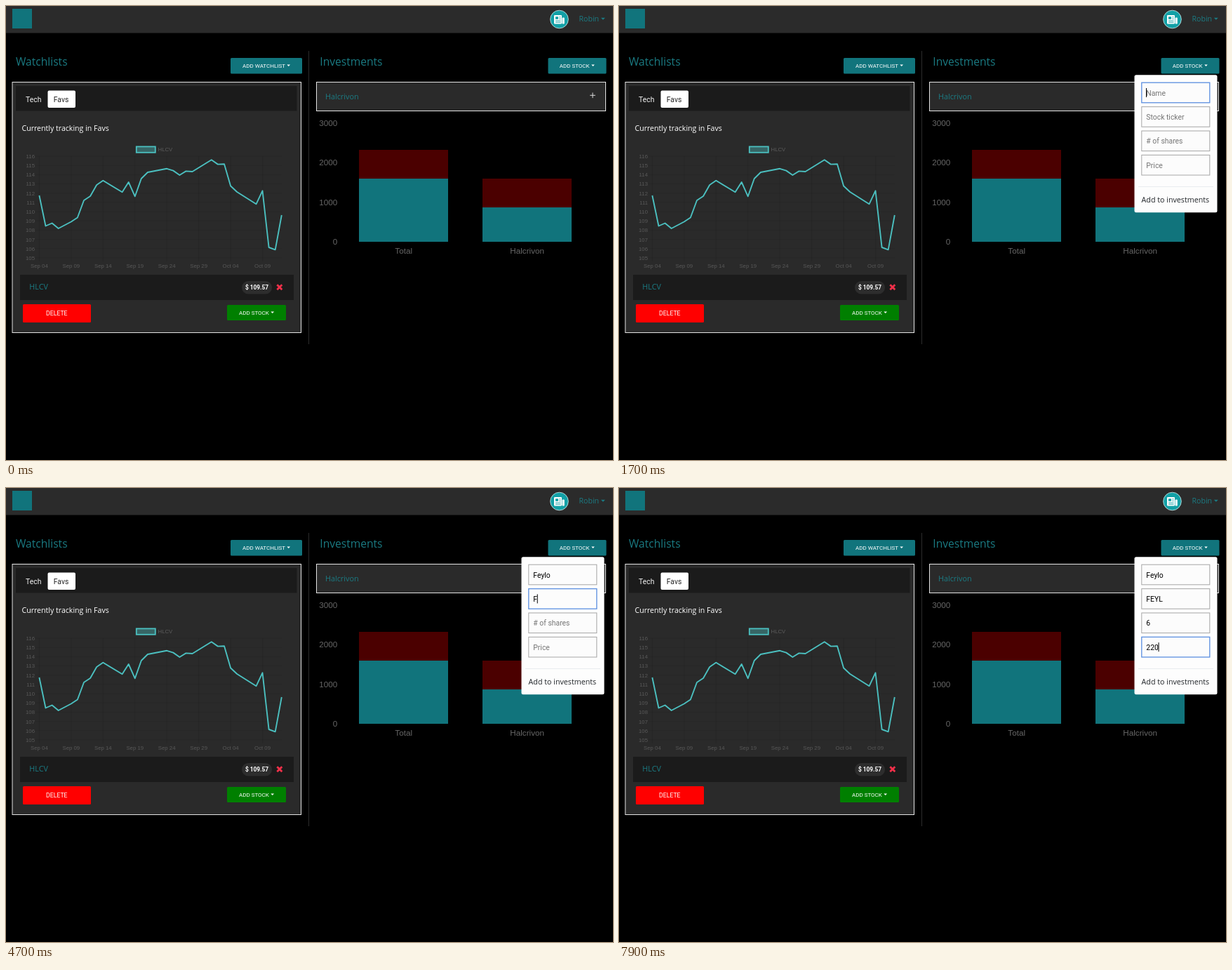
An HTML page for the animation above (8000 ms loop, 865x647 px).

```html
<!DOCTYPE html>
<html lang="en">
<head>
<meta charset="utf-8">
<title>Stock dashboard</title>
<style>
html, body { margin: 0; width: 100%; height: 100%; overflow: hidden; background: #000; }
svg { display: block; width: 865px; height: 647px; }
text { white-space: pre; }
.open { font-family: "Open Sans", "Noto Sans", sans-serif; }
.robo { font-family: Roboto, sans-serif; }
.arial { font-family: "Liberation Sans", Arial, sans-serif; }
</style>
</head>
<body>
<svg id="stage" viewBox="0 0 865 647" xmlns="http://www.w3.org/2000/svg"></svg>
<script>
const LOOP = 8000;
const STEP = 100;
const TEAL = '#11747c';
const LINE = '#4bc0c0';
const stage = document.getElementById('stage');

// Markup helpers
const rect = (x, y, w, h, fill, more = '') =>
  `<rect x="${x}" y="${y}" width="${w}" height="${h}" fill="${fill}" ${more}/>`;
const text = (x, y, size, fill, font, s, more = '') =>
  `<text x="${x}" y="${y}" font-size="${size}" fill="${fill}" class="${font}" ${more}>${s}</text>`;
const path = (d, more) => `<path d="${d}" ${more}/>`;
const caretDown = (x, y, fill, w = 4.6) =>
  path(`M${x} ${y}h${w}l${-w / 2} ${w / 2}z`, `fill="${fill}"`);
const middle = 'text-anchor="middle"';
const end = 'text-anchor="end"';

const button = (x, y, w, h, fill, label, tx) =>
  rect(x, y, w, h, fill, 'rx="1.5"') +
  text(tx, y + 13.8, 8, '#fff', 'robo', label);

function navbar() {
  return rect(0, 0, 865, 38.5, '#2b2b2b') +
    rect(9, 4, 28, 28, TEAL) +
    '<circle cx="788.5" cy="19" r="12.8" fill="#12a0a6" stroke="#d5eeee" stroke-width=".8"/>' +
    rect(781, 13, 11, 12.5, '#fff', 'rx="1"') +
    rect(792.6, 16.5, 3.2, 9, '#fff', 'rx="1"') +
    rect(783, 15.2, 4, 3.6, '#12a0a6') +
    path('M788.2 15.8h2.4M788.2 18.3h2.4M783 21h7.6M783 23.2h7.6', 'stroke="#12a0a6" stroke-width=".9"') +
    text(816.5, 22.4, 10.6, '#1b7c84', 'open', 'Robin') +
    caretDown(847.8, 16.8, '#1b7c84', 6);
}

function lineChart() {
  const dayX = d => 47.4 + d * 9.09;
  const rowY = i => 214 + i * 13.18;
  const days = ['Sep 04', 'Sep 09', 'Sep 14', 'Sep 19', 'Sep 24', 'Sep 29', 'Oct 04', 'Oct 09'];
  const points = [
    [0, 270], [1, 313.5], [2, 309.5], [3, 317], [5, 307.5], [6, 301.5], [7, 277], [8, 271],
    [9, 255], [10, 248.8], [13, 265.3], [14, 251], [15, 271.3], [16, 246], [17, 237],
    [20, 231.8], [21, 234.6], [22, 241], [23, 235.4], [24, 236], [27, 219.3], [28, 225.6],
    [29, 225.2], [30, 256.5], [31, 265], [34, 282.3], [35, 263.3], [36, 344], [37, 347.3], [38, 298]
  ];
  let out = '', grid = '';
  for (let i = 0; i < 12; i++) {
    grid += `M42 ${rowY(i)}H393`;
    out += text(41, rowY(i) + 2.9, 7.8, '#585858', 'arial', 116 - i, end);
  }
  days.forEach((label, i) => {
    grid += `M${dayX(i * 5)} 214V364`;
    out += text(dayX(i * 5), 372.8, 7.8, '#585858', 'arial', label, middle);
  });
  const d = 'M' + points.map(([day, y]) => `${dayX(day).toFixed(1)} ${y}`).join('L');
  return path(grid, 'stroke="#000" stroke-opacity=".12" stroke-width=".8"') + out +
    rect(185.8, 200.4, 27, 8.4, 'rgba(75,192,192,.4)', `stroke="${LINE}" stroke-width="1.8"`) +
    text(216.5, 207.4, 7.8, '#5c5c5c', 'arial', 'HLCV') +
    path(d, `fill="none" stroke="${LINE}" stroke-width="1.9" stroke-linejoin="round"`);
}

function watchlists() {
  return text(14, 85, 15.6, '#1a7a82', 'open', 'Watchlists') +
    button(320, 74, 102, 22.5, TEAL, 'ADD WATCHLIST', 337) +
    caretDown(400.4, 83.6, '#fff') +
    rect(9, 108.5, 411.5, 357, '#2a2a2a', 'stroke="#e4e4e4"') +
    rect(14, 114, 400.5, 35.5, '#1b1b1b') +
    text(28, 136.8, 10.4, '#f2f2f2', 'robo', 'Tech') +
    rect(59.5, 120.5, 39.5, 24.5, '#fff', 'rx="2"') +
    text(67.8, 136.8, 10.4, '#222', 'robo', 'Favs') +
    text(22.5, 177.6, 10.6, '#fff', 'open', 'Currently tracking in Favs') +
    lineChart() +
    rect(20, 383, 390, 36, '#1b1b1b') +
    text(33.3, 403.6, 10.8, '#1b7c84', 'open', 'HLCV') +
    rect(336, 392, 43, 18.5, '#2d2d2d', 'rx="9.2"') +
    text(357.5, 404, 8.3, '#fff', 'robo', '$ 109.57', middle + ' font-weight="700"') +
    path('M386.3 397.3l7 7M393.3 397.3l-7 7', 'stroke="#f2304a" stroke-width="2.7"') +
    rect(24, 425, 97, 26, '#f00', 'rx="1.5"') +
    text(72.3, 441.2, 8.7, '#fff', 'robo', 'DELETE', middle) +
    button(315, 426, 84, 22, '#007f00', 'ADD STOCK', 332) +
    caretDown(377.4, 435.6, '#fff');
}

function investments() {
  let out = text(447.3, 85, 15.6, '#1a7a82', 'open', 'Investments') +
    rect(442.5, 108.5, 412, 41, '#2a2a2a', 'stroke="#e4e4e4"') +
    text(455, 132.6, 10.8, '#1b7c84', 'open', 'Halcrivon') +
    path('M832.2 127.3h7.6M836 123.5v7.6', 'stroke="#ddd" stroke-width="1"');
  for (let i = 0; i < 4; i++)
    out += text(472.3, 170.6 + i * 56.5, 11.7, '#666', 'arial', 3000 - i * 1000, end);
  [[503, 205, 246, 'Total'], [679, 246, 287, 'Halcrivon']].forEach(([x, top, mid, label]) => {
    out += rect(x, top, 127, mid - top, '#4b0000') +
      rect(x, mid, 127, 336 - mid, TEAL) +
      text(x + 63.7, 353, 11.7, '#666', 'arial', label, middle);
  });
  return out + button(772.5, 74, 83, 22.5, TEAL, 'ADD STOCK', 788.7);
}

// Form: focus time, then the moments at which each letter lands
const fields = [
  { y: 109, hint: 'Name', value: 'Feylo', focus: 1600, keys: [2900, 3050, 3200, 3350, 3500] },
  { y: 143.4, hint: 'Stock ticker', value: 'FEYL', focus: 4200, keys: [4700, 4850, 5000, 5150] },
  { y: 177.8, hint: '# of shares', value: '6', focus: 5400, keys: [6200] },
  { y: 212.2, hint: 'Price', value: '220', focus: 6800, keys: [7400, 7550, 7700] }
];
const OPEN = 1300;

function menu() {
  return `<g id="menu">` +
    rect(734.5, 98.3, 118, 196, '#fdfdfd', 'rx="2.5"') +
    fields.map(f =>
      rect(744.8, f.y + .2, 97, 28.6, '#fcfcfc', 'class="box" stroke="#a6a6a6"') +
      text(751.3, f.y + 18.6, 10.4, '#757575', 'robo', f.hint, 'data-field')).join('') +
    rect(751, 0, 1, 13, '#000', 'id="caret"') +
    rect(740, 257, 107, 1, '#e9ecef') +
    text(744.6, 279.7, 10.7, '#212529', 'open', 'Add to investments') +
    '</g>';
}

const hand = 'M0 1.2C0-.5 2.3-.5 2.3 1.2V5.6C2.8 4.8 4.4 5 4.5 6C5.2 5.2 6.6 5.6 6.7 6.6' +
  'C7.5 6 8.8 6.4 8.8 7.6V10C8.8 11.4 7.8 12 7.7 13.6H1.9C1.7 12.2-.6 10.2-1.6 8.6' +
  'C-2.4 7.2-.8 6.6 0 7.8Z';
const arrow = 'M0 0V11.5L2.7 9L4.5 13L6.3 12.2L4.5 8.3H8.2Z';

stage.innerHTML =
  '<clipPath id="edge"><rect x="772.5" y="74" width="83" height="22.5" rx="1.5"/></clipPath>' +
  rect(0, 0, 865, 647, '#000') + navbar() +
  rect(431, 64, 1, 418, '#2c2c2c') +
  watchlists() + investments() +
  '<g clip-path="url(#edge)"><circle id="ripple" cx="809" cy="86" fill="#fff"/></g>' +
  caretDown(834.2, 83.6, '#fff') + menu() +
  path(hand, 'id="cursor" fill="#fff" stroke="#111" stroke-width=".8" stroke-linejoin="round"');

const $ = id => document.getElementById(id);
const menuEl = $('menu'), ripple = $('ripple'), caret = $('caret'), cursor = $('cursor');
const boxes = [...stage.querySelectorAll('.box')];
const labels = [...stage.querySelectorAll('[data-field]')];
const show = (el, on) => el.setAttribute('visibility', on ? 'visible' : 'hidden');

// Pointer stops: time, x, y
const stops = [[600, 772, 225], [1000, 809, 87.5], [1400, 809, 87.5], [1600, 800, 119]];

function drawCursor(t) {
  const i = stops.findIndex(s => t < s[0]);
  show(cursor, i > 0);
  if (i < 1) return;
  const [t0, x0, y0] = stops[i - 1], [t1, x1, y1] = stops[i];
  const u = (t - t0) / (t1 - t0), k = u * u * (3 - 2 * u);
  const x = x0 + (x1 - x0) * k, y = y0 + (y1 - y0) * k;
  cursor.setAttribute('d', y < 96 ? hand : arrow);
  cursor.setAttribute('transform', `translate(${x} ${y})`);
}

function drawRipple(t) {
  const age = t - OPEN;
  show(ripple, age >= 0 && age < 400);
  ripple.setAttribute('r', 26 + Math.max(0, age) * .12);
  ripple.setAttribute('fill-opacity', Math.max(0, .24 * (1 - age / 400)));
}

function drawForm(t) {
  show(menuEl, t >= OPEN);
  const active = fields.filter(f => t >= f.focus).length - 1;
  fields.forEach((f, i) => {
    const typed = f.value.slice(0, f.keys.filter(k => t >= k).length);
    labels[i].textContent = typed || f.hint;
    labels[i].setAttribute('fill', typed ? '#000' : '#757575');
    boxes[i].setAttribute('stroke', i === active ? '#5b8fe0' : '#a6a6a6');
    boxes[i].setAttribute('stroke-width', i === active ? 1.3 : 1);
    if (i !== active) return;
    const last = Math.max(f.focus, ...f.keys.filter(k => t >= k));
    const width = typed ? labels[i].getComputedTextLength() : 0;
    caret.setAttribute('x', 751 + width);
    caret.setAttribute('y', f.y + 8);
  });
  const f = fields[active];
  const last = f ? Math.max(f.focus, ...f.keys.filter(k => t >= k)) : 0;
  show(caret, f && (t - last) % 1000 < 500);
}

function frame() {
  const t = Math.floor(performance.now() % LOOP / STEP) * STEP;
  drawCursor(t);
  drawRipple(t);
  drawForm(t);
  requestAnimationFrame(frame);
}
frame();
</script>
</body>
</html>
```
